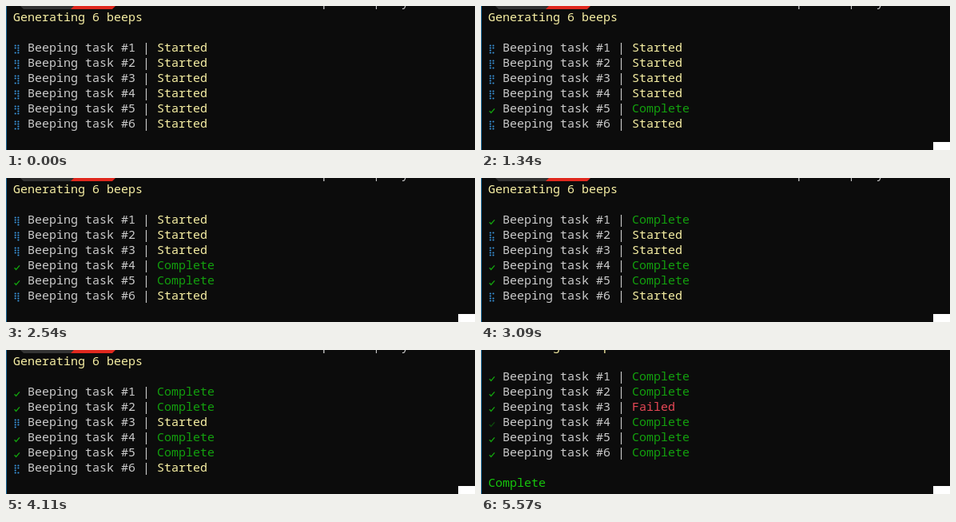
Animation, 587 px wide and 180 px high, one loop 5.83 s. Source, as an HTML page with a canvas:

```html
<!DOCTYPE html>
<html lang="en">
<head>
<meta charset="utf-8">
<title>Beeping tasks</title>
<style>
html, body { margin: 0; width: 100%; height: 100%; overflow: hidden; background: #0c0c0c; }
canvas { display: block; }
</style>
</head>
<body>
<canvas id="stage" width="587" height="180"></canvas>
<script>
const ctx = document.getElementById('stage').getContext('2d');
const LOOP = 5830, SCROLL_AT = 5570, LINE = 19, COL = 9;
const GREY = '#ccc', YELLOW = '#f9f1a5', GREEN = '#13a10e', LIME = '#16c60c',
      RED = '#e74856', BLUE = '#3a96dd';
const doneAt = [2640, 3600, 4650, 1610, 590, 5510];
const FAILED = 2;
// Braille cells as [column, row], clockwise from the top left
const ring = [[0, 0], [1, 0], [1, 1], [1, 2], [1, 3], [0, 3], [0, 2], [0, 1]];

function write(text, column, y, color) {
  ctx.fillStyle = color;
  ctx.fillText(text, COL * (column + 1), y);
}

function polygon(color, points) {
  ctx.fillStyle = color;
  ctx.beginPath();
  points.forEach(([x, y]) => ctx.lineTo(x, y));
  ctx.fill();
}

function spinner(y, gap) {
  ctx.fillStyle = BLUE;
  ring.forEach(([column, row], i) => {
    if (i === gap) return;
    ctx.beginPath();
    ctx.arc(11.7 + column * 3.7, y - 2.5 + row * 3, 1.1, 0, 7);
    ctx.fill();
  });
}

function check(y, color) {
  ctx.strokeStyle = color;
  ctx.lineWidth = 1.4;
  ctx.beginPath();
  ctx.moveTo(10.6, y + 3.2);
  ctx.lineTo(12.6, y + 5.4);
  ctx.lineTo(17, y + 0.4);
  ctx.stroke();
}

function prompt() {
  polygon('#333', [[18, 0], [88, 0], [83, 4], [22, 4]]);
  polygon('#e0281e', [[85, 0], [137, 0], [133, 4], [81, 4]]);
  write('dotnet run ./sample.cs | any', 27, 0, GREY);
}

function task(i, t, top) {
  const y = 52 + i * LINE + top;
  const done = t >= doneAt[i];
  const gap = i === 5 ? 6 + Math.floor((t + 38.6) / 109.9) : 6 + Math.floor((t + 90) / 110);
  if (!done) spinner(y, gap % 8);
  else check(y, y === 90 && t >= doneAt[FAILED] ? '#0d4a0c' : GREEN);

  write(`Beeping task #${i + 1} |`, 2, y + 5, GREY);
  const [label, color] = !done ? ['Started', YELLOW]
    : i === FAILED ? ['Failed', RED] : ['Complete', GREEN];
  write(label, 20, y + 5, color);
}

function draw(t) {
  const scrolled = t >= SCROLL_AT;
  const top = scrolled ? -LINE : 0;
  ctx.fillStyle = '#0c0c0c';
  ctx.fillRect(0, 0, 587, 180);
  ctx.font = '15px "Noto Sans Mono", "DejaVu Sans Mono", monospace';

  if (!scrolled) prompt();
  write('Generating 6 beeps', 0, LINE + top, YELLOW);
  doneAt.forEach((_, i) => task(i, t, top));
  if (scrolled) write('Complete', 0, 171, LIME);

  ctx.fillStyle = '#1b6797';
  ctx.fillRect(0, 0, 1, 180);
  const fade = Math.min(1, Math.max(0, (t - 542) / 130));
  ctx.fillStyle = `rgba(255, 255, 255, ${fade})`;
  ctx.fillRect(566, 170, 21, 10);
}

const start = performance.now();
(function frame() {
  draw((performance.now() - start) % LOOP);
  requestAnimationFrame(frame);
})();
</script>
</body>
</html>
```
